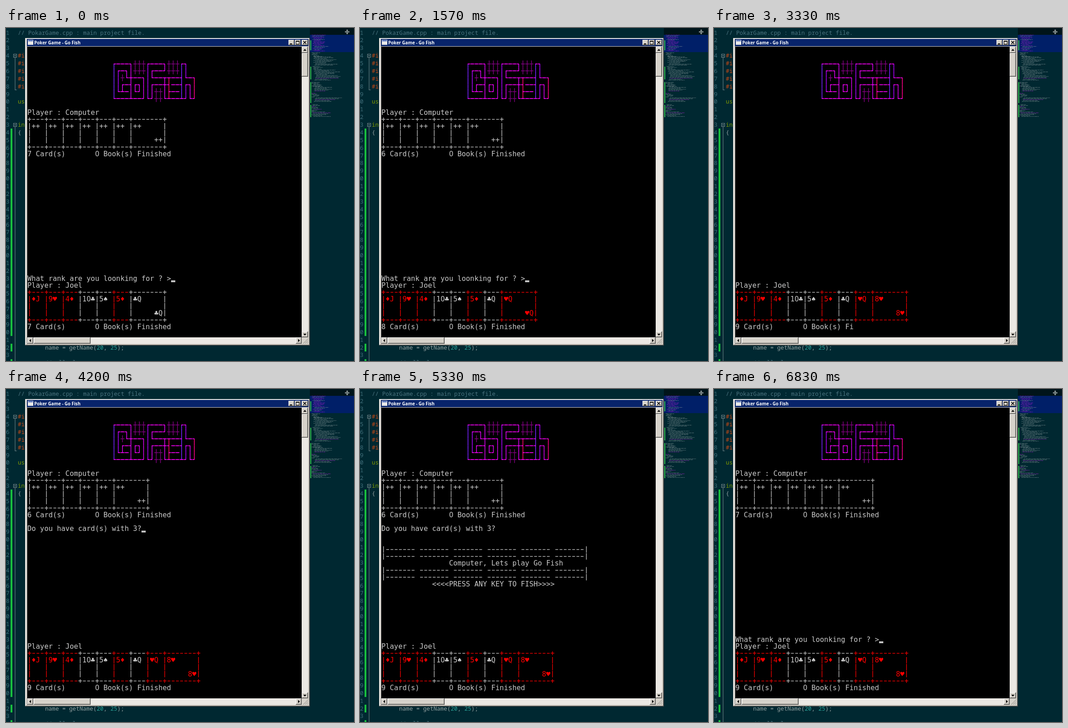
Write an HTML page with a canvas that moves like this. It is 765 px wide and 732 px high and loops after 8 s.

```html
<!DOCTYPE html>
<html lang="en">
<head>
<meta charset="utf-8">
<title>Go Fish</title>
<style>
html, body { margin: 0; width: 100%; height: 100%; overflow: hidden; background: #002831; }
canvas { display: block; }
</style>
</head>
<body>
<canvas id="stage" width="765" height="732"></canvas>
<script>
const ctx = document.getElementById('stage').getContext('2d');
const LOOP = 8000;
const LEFT = 47, TOP = 41, CW = 9.29, CH = 15.21;
const MONO = '"DejaVu Sans Mono", monospace', CODE = '"Noto Sans Mono", monospace';
const GRAY = '#cacaca', RED = '#f00', FACE = '#d6d2ca';
const PLAYER = 'Joel';
const HAND = ['♦J', '9♥', '4♦', '10♣', '5♠', '5♦', '♣Q', '♥Q', '8♥'];
const TITLE = [
  '┌───┐┼┼┼┌───┐┼┼┼┌┐',
  '│┌─┐│┼┼┼│┌──┘┼┼┼││',
  '││┼└┼──┐│└──┬┬──┤└─┐',
  '││┌─┤┌┐││┌──┼┤──┤┌┐│',
  '│└┴─│└┘│││┼┼│├──││││',
  '└───┴──┘└┘┼┼└┴──┴┘└┘'
];
// arms of each box character: left, right, up, down
const ARMS = { '─': 'lr', '│': 'ud', '┌': 'rd', '┐': 'ld', '└': 'ru', '┘': 'lu',
  '┬': 'lrd', '┴': 'lru', '├': 'rud', '┤': 'lud', '┼': 'lrud' };
const TINT = { 0: '#72f', 1: '#a0f', 8: '#a0f', 13: '#f06', 16: '#72f', 17: '#a0f', 19: '#f08' };

function rect(x, y, w, h, color) {
  ctx.fillStyle = color;
  ctx.fillRect(x, y, w, h);
}

function label(str, x, y, color, font) {
  ctx.font = font;
  ctx.fillStyle = color;
  ctx.fillText(str, x, y);
}

function path(points, color) {
  ctx.beginPath();
  points.forEach(([x, y]) => ctx.lineTo(x, y));
  ctx.fillStyle = color;
  ctx.fill();
}

function raised(x, y, w, h) {
  rect(x, y, w, h, '#505050');
  rect(x, y, w - 1, h - 1, '#fff');
  rect(x + 1, y + 1, w - 2, h - 2, '#8a8780');
  rect(x + 1, y + 1, w - 3, h - 3, FACE);
}

function drawCode() {
  rect(0, 0, 765, 732, '#002831');
  const line = n => 10 + 16.88 * (n - 1);
  const code = (n, x, str, color) => label(str, x, line(n) + 4.5, color, '12.58px ' + CODE);
  for (let n = 1; n <= 43; n++) code(n, 0, String(n % 10), '#3f6d79');
  for (const [y, h] of [[221, 456], [694, 17], [728, 4]]) rect(10, y, 4, h, '#18bf3e');

  rect(19.5, 65, 1, 71, '#7b8c90');
  rect(19.5, 135.5, 4, 1, '#7b8c90');
  rect(19.5, 217, 1, 515, '#7b8c90');
  for (const y of [57, 209]) {
    rect(16, y, 8, 8, '#7b8c90');
    rect(17, y + 1, 6, 6, '#002831');
    rect(18, y + 3.5, 4, 1, '#b0bcc0');
  }

  code(1, 26, '// PokarGame.cpp : main project file.', '#4c7480');
  for (let n = 4; n <= 8; n++) code(n, 26, '#i', '#cb4b16');
  code(10, 26, 'us', '#7f9a00');
  code(13, 26, 'in', '#7f9a00');
  code(14, 26, '{', '#93a1a1');
  code(42, 86, 'name = getName(', '#93a1a1');
  code(42, 199.3, '20', '#2aa198');
  code(42, 214.4, ',', '#93a1a1');
  code(42, 229.5, '25', '#2aa198');
  code(42, 244.6, ');', '#93a1a1');
  code(44, 86, '// all players', '#4c7480');
}

function drawMinimap() {
  rect(668, 0, 97, 15, '#00141a');
  rect(668, 15, 97, 38, '#001f68');
  rect(745, 7.5, 10, 2, '#a8b0b0');
  rect(749.5, 4, 1, 9, '#a8b0b0');
  path([[747.5, 6], [750, 3], [752.5, 6]], '#a8b0b0');
  path([[747.5, 11], [750, 14], [752.5, 11]], '#a8b0b0');
  for (const [y, h] of [[27, 22], [85, 28], [119, 46], [169, 27]]) rect(669, y, 2, h, '#35c050');

  let seed = 7;
  const rnd = () => (seed = seed * 16807 % 2147483647) / 2147483647;
  // top, bottom, indent, longest line
  const blocks = [[15, 26, 672, 32], [26, 52, 674, 34], [54, 63, 672, 20], [63, 82, 676, 58],
    [84, 92, 672, 25], [92, 115, 678, 58], [119, 128, 672, 22], [128, 140, 676, 40],
    [143, 153, 672, 16], [153, 163, 677, 70], [168, 184, 672, 18], [184, 196, 672, 48]];
  ctx.globalAlpha = 0.6;
  for (const [top, bottom, indent, longest] of blocks) {
    for (let y = top; y < bottom; y += 2) {
      const start = indent + Math.floor(rnd() * 3) * 2;
      const end = start + longest * (0.35 + 0.65 * rnd());
      const color = rnd() < (y < 53 ? 0.6 : 0.18) ? '#b01fd0' : '#8d9a9c';
      for (let x = start; x < end;) {
        const w = 2 + rnd() * 5;
        rect(x, y, Math.min(w, end - x), 1, color);
        x += w + 1;
      }
    }
  }
  ctx.globalAlpha = 1;
}

function drawWindow() {
  rect(42, 22, 626, 676, '#404040');
  rect(42, 22, 625, 675, FACE);
  rect(43, 23, 623, 1, '#fff');
  rect(43, 23, 1, 673, '#fff');
  rect(666, 23, 1, 674, '#85827c');
  rect(43, 696, 624, 1, '#85827c');
  rect(46, 24, 619, 16, '#08246b');
  rect(48, 26, 12, 11, '#e8e8e8');
  rect(49, 27, 10, 2, '#2a50b0');
  label('Poker Game - Go Fish', 62, 35.5, '#fff', 'bold 9.7px "Open Sans", sans-serif');

  raised(621, 26, 13, 12);
  raised(635, 26, 13, 12);
  raised(650, 26, 14, 12);
  rect(624, 34, 5, 2, '#000');
  rect(637, 28, 8, 8, '#000');
  rect(638, 30, 6, 5, FACE);
  ctx.strokeStyle = '#000';
  ctx.lineWidth = 1.5;
  ctx.beginPath();
  ctx.moveTo(653.5, 28.5); ctx.lineTo(660, 35);
  ctx.moveTo(660, 28.5); ctx.lineTo(653.5, 35);
  ctx.stroke();

  rect(46, 40, 1, 655, '#707070');
  rect(650, 41, 14, 639, '#ebe8e3');
  raised(650, 41, 14, 14);
  raised(650, 55, 14, 52);
  raised(650, 667, 14, 13);
  path([[653.5, 50], [657, 46], [660.5, 50]], '#000');
  path([[653.5, 672], [657, 676], [660.5, 672]], '#000');

  rect(47, 680, 603, 14, '#ebe8e3');
  raised(47, 680, 13, 14);
  raised(61, 680, 125, 14);
  raised(637, 680, 13, 14);
  path([[55, 683.5], [51, 687], [55, 690.5]], '#000');
  path([[642, 683.5], [646, 687], [642, 690.5]], '#000');
  ctx.strokeStyle = '#85827c';
  ctx.lineWidth = 1;
  ctx.beginPath();
  for (const d of [3, 7, 11]) {
    ctx.moveTo(664 - d, 694);
    ctx.lineTo(664, 694 - d);
  }
  ctx.stroke();
}

function put(col, row, str, color = GRAY) {
  const y = TOP + row * CH;
  [...str].forEach((ch, i) => {
    const x = LEFT + (col + i) * CW;
    if (ch === '-') rect(x + 1.5, y + 7, 6.2, 1.3, color);
    else if (ch === '|') rect(x + 4, y + 0.5, 1.3, 14.2, color);
    // the plain sans face has an undotted zero
    else if (ch === '0') label(ch, x, y + 12.7, color, '15px "DejaVu Sans", sans-serif');
    else if (ch !== ' ') label(ch, x, y + 12.7, color, '15.43px ' + MONO);
  });
}

function drawTitle() {
  TITLE.forEach((str, r) => [...str].forEach((ch, c) => {
    const x = LEFT + (20 + c) * CW, y = TOP + (2 + r) * CH;
    const mx = x + CW / 2, my = y + CH / 2;
    const fill = ch === '┼' && !(r === 2 && c === 4) && !(r === 3 && c === 12);
    const flat = fill ? '#780078' : '#f0f';
    const tall = fill ? '#780078' : TINT[c] || '#d800f0';
    const arms = ARMS[ch];
    if (arms.includes('u')) rect(mx - 0.8, y, 1.6, CH / 2, tall);
    if (arms.includes('d')) rect(mx - 0.8, my, 1.6, CH / 2, tall);
    if (arms.includes('l')) rect(x + 0.4, my - 0.8, CW / 2, 1.6, flat);
    if (arms.includes('r')) rect(mx - 0.8, my - 0.8, CW / 2 + 0.5, 1.6, flat);
  }));
}

function drawCards(row, cards) {
  cards.forEach((card, i) => {
    const last = i === cards.length - 1, width = last ? 7 : 3, col = i * 4;
    const color = /[♦♥]/.test(card) ? RED : GRAY;
    const edge = '+' + '-'.repeat(width) + (last ? '+' : '');
    const side = str => '|' + str + (last ? '|' : '');
    put(col, row, edge, color);
    put(col, row + 1, side(card.padEnd(width)), color);
    put(col, row + 2, side(' '.repeat(width)), color);
    put(col, row + 3, side((last ? card : '').padStart(width)), color);
    put(col, row + 4, edge, color);
  });
}

function drawPlayer(row, name, cards, shown) {
  put(0, row, 'Player : ' + name);
  drawCards(row + 1, cards);
  put(0, row + 6, (cards.length + ' Card(s)       0 Book(s) Finished').slice(0, shown));
}

function drawFish(name) {
  const rule = '|' + Array(6).fill('-------').join(' ') + '|';
  for (const row of [20, 21, 23, 24]) put(0, row, rule);
  put(16, 22, name + ', Lets play Go Fish');
  put(12, 25, '<<<<PRESS ANY KEY TO FISH>>>>');
}

function cursor(col, row) {
  rect(LEFT + col * CW, TOP + row * CH + 11.8, CW, 4, GRAY);
}

function drawConsole(t) {
  const during = (from, to = LOOP) => t >= from && t < to;
  const dealing = during(800, 850) || during(3330, 3420) || during(6020, 6070);
  rect(LEFT, TOP, 603, 639, '#000');
  drawTitle();

  const held = t < 800 ? 7 : t < 3330 ? 8 : 9;
  drawPlayer(34, PLAYER, HAND.slice(0, held), !dealing ? 99 : t < 850 ? 6 : 28);
  if (!dealing) drawPlayer(9, 'Computer', Array(during(800, 6070) ? 6 : 7).fill('++'), 99);

  if (during(0, 800) || during(900, 3330) || during(6070)) {
    const typed = during(550, 800) ? 'q' : during(2110, 3330) ? '5' : '';
    put(0, 33, 'What rank are you loonking for ? >' + typed);
  }
  if (during(0, 500) || during(1570, 2060) || during(6830)) cursor(34, 33);

  if (during(3420, 6020)) put(0, 17, 'Do you have card(s) with 3?');
  if (during(4200, 5270)) cursor(27, 17);

  if (during(2290, 3330)) drawFish(PLAYER);
  if (during(5330, 6020)) drawFish('Computer');
}

drawCode();
drawMinimap();
drawWindow();

const start = performance.now();
function frame() {
  drawConsole((performance.now() - start) % LOOP);
  requestAnimationFrame(frame);
}
frame();
</script>
</body>
</html>
```
